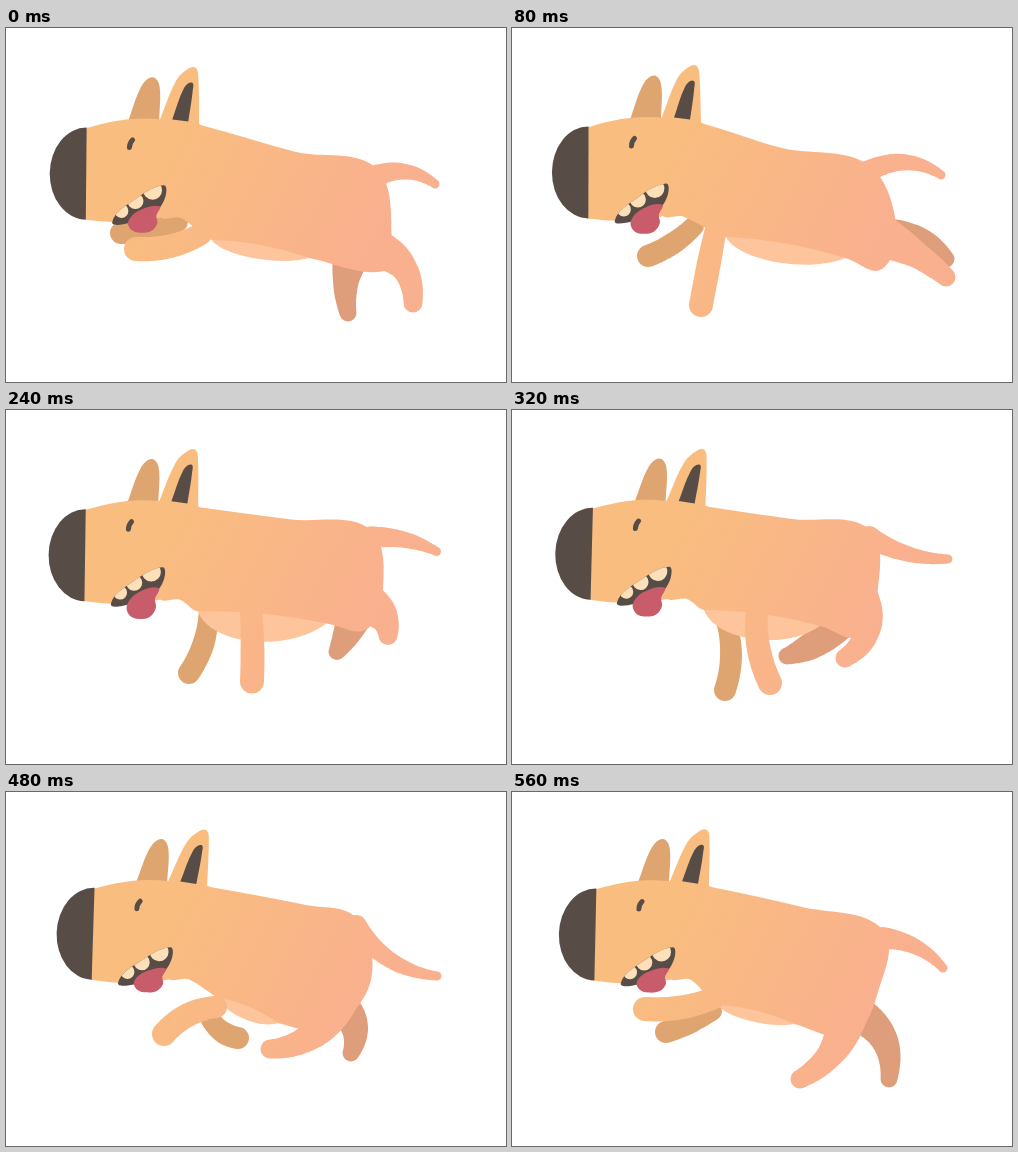
Write an HTML page with a canvas that moves like this. It is 500 by 354 pixels and loops after 640 ms.

```html
<!DOCTYPE html>
<html lang="en">
<head>
<meta charset="utf-8">
<title>Running dog</title>
<style>
html, body { margin: 0; width: 100%; height: 100%; overflow: hidden; background: #fff; }
canvas { display: block; width: 500px; height: 354px; }
</style>
</head>
<body>
<canvas id="stage" width="500" height="354"></canvas>
<script>
const ctx = document.getElementById('stage').getContext('2d');
const STEP = 80;
// Which key pose each step shows; halves blend two neighbours.
const CYCLE = [0, 1, 2, 2.5, 3, 3.5, 4, 5];

const DARK = '#574d46', FAR_FRONT = '#dfa571', FAR_HIND = '#de9d7b';
const TONGUE = '#c85c6a', TOOTH = '#fddfb9', BELLY = '#fec49c';
const coat = ctx.createLinearGradient(170, 100, 370, 205);
coat.addColorStop(0, '#f9bd7f');
coat.addColorStop(1, '#f9b08f');

// Radii at the root, middle and end of each kind of limb
const FRONT = [11, 12, 12], NEAR_HIND = [22, 13, 9.5], FAR_LEG = [20, 13, 8.5], TAIL = [11, 7.5, 4.5];

// Rig joints as x, y pairs, one row per key pose
const rig = {
  head: [[0, 0], [-4, -1.5], [-2, 0.5], [0, -1], [7.5, -2.8], [3.5, -2.5]]
};
// spine, croup, rump, groin, belly back, belly front
rig.body = [
  [290,124, 370,140, 386,212, 378,243, 303,230, 206,212],
  [270,120, 355,136, 384,195, 370,241, 333,230, 214,209],
  [290,110, 371,120, 388,186, 375,213, 333,211, 192,203],
  [280,109, 357,119, 366,178, 345,226, 308,216, 192,200],
  [300,113, 350,126, 365,188, 325,236, 272,231, 213,206],
  [290,115, 371,138, 366,200, 339,244, 282,232, 206,213]
];
// middle, tip
rig.tail = [
  [402,144, 429,156], [400,135, 429,147], [411,118, 425,134],
  [400,145, 436,149], [395,174, 431,184], [406,156, 431,176]
];
// shoulder, elbow, paw
rig.nearFront = [
  [195,206, 155,220, 130,221], [203,205, 197,235, 189,277], [245,200, 245,240, 234,270],
  [245,200, 248,245, 258,273], [210,215, 182,223, 158,242], [202,206, 165,216, 133,217]
];
rig.farFront = [
  [172,194, 145,202, 115,205], [182,198, 160,216, 136,228], [193,203, 175,225, 153,246],
  [212,205, 219,245, 213,280], [205,228, 220,242, 232,246], [200,219, 175,232, 154,240]
];
// knee, paw
rig.nearHind = [
  [398,240, 407,275], [405,227, 434,249], [405,200, 431,203],
  [354,222, 333,248], [300,247, 264,257], [317,264, 288,287]
];
rig.farHind = [
  [340,252, 342,285], [415,217, 434,231], [384,215, 387,237],
  [295,238, 275,246], [349,238, 345,261], [374,252, 377,287]
];

// Parts of the head, before it is moved
const skull = [79,101, 101,95, 126,91, 152,91, 198,99, 225,130, 200,175, 165,188, 108,194, 79,192];
const farEar = [122,93, 135,58, 146,49, 153,58, 153,93];
const nearEar = [153,93, 169,52, 181,40, 188,39, 191,47, 193,98];
const innerEar = [166,91, 177,60, 185,54, 186,62, 182,93];
const mouth = [107,194, 130,171, 158,157, 160,168, 150,184, 124,195];
const tongue = [123,194, 133,183, 154,178, 151,188, 152,196, 146,204, 135,206, 126,203];

const mix = (a, b, f) => a.map((v, i) => v + (b[i] - v) * f);
const blend = (rows, k) => mix(rows[Math.floor(k)], rows[Math.ceil(k)], k % 1);
const wave = (step, peak) => Math.cos((step - peak) * Math.PI / 4);

function fill(color) {
  ctx.fillStyle = color;
  ctx.fill();
}

// Smooth shape through flat x, y points
function blob(pts, color, closed = true) {
  const n = pts.length / 2;
  const at = i => {
    const k = closed ? (i + n) % n : Math.max(0, Math.min(n - 1, i));
    return [pts[2 * k], pts[2 * k + 1]];
  };
  const dir = i => {
    const [ax, ay] = at(i - 1), [bx, by] = at(i + 1);
    const d = Math.hypot(bx - ax, by - ay) || 1;
    return [(bx - ax) / d, (by - ay) / d];
  };
  ctx.beginPath();
  ctx.moveTo(...at(0));
  for (let i = 0; i < (closed ? n : n - 1); i++) {
    const [ax, ay] = at(i), [bx, by] = at(i + 1);
    const [ux, uy] = dir(i), [vx, vy] = dir(i + 1);
    const h = Math.hypot(bx - ax, by - ay) / 3;
    ctx.bezierCurveTo(ax + ux * h, ay + uy * h, bx - vx * h, by - vy * h, bx, by);
  }
  fill(color);
}

// Tapered limb that bends through three joints
function limb([ax, ay, bx, by, cx, cy], [ra, rb, rc], color) {
  const la = Math.hypot(bx - ax, by - ay), lb = Math.hypot(cx - bx, cy - by);
  const m = la / (la + lb);
  const bend = (a, b, c) => (b - (1 - m) ** 2 * a - m * m * c) / (2 * m * (1 - m));
  const qx = bend(ax, bx, cx), qy = bend(ay, by, cy);
  const along = (a, q, c, t) => (1 - t) ** 2 * a + 2 * t * (1 - t) * q + t * t * c;
  ctx.beginPath();
  for (let i = 0; i <= 50; i++) {
    const t = i / 50;
    const x = along(ax, qx, cx, t), y = along(ay, qy, cy, t);
    const r = t < m ? ra + (rb - ra) * t / m : rb + (rc - rb) * (t - m) / (1 - m);
    ctx.moveTo(x + r, y);
    ctx.arc(x, y, r, 0, 2 * Math.PI);
  }
  fill(color);
}

function drawBelly(front, back, depth) {
  const [x1, y1] = mix(front, back, 0.5), [x2, y2] = mix(front, back, 0.7), [x3, y3] = mix(front, back, 0.1);
  ctx.beginPath();
  ctx.moveTo(...front);
  ctx.quadraticCurveTo(x1, y1 - 8, ...back);
  ctx.bezierCurveTo(x2, y2 + depth * 1.4, x3, y3 + depth * 1.4, ...front);
  fill(BELLY);
}

function inHead([dx, dy], turn, paint) {
  ctx.save();
  ctx.translate(125 + dx, 116 + dy);
  ctx.rotate(turn * Math.PI / 180);
  ctx.translate(-125, -116);
  paint();
  ctx.restore();
}

// Slant an ear: higher points move further
const slant = (pts, lean) =>
  pts.map((v, i) => i % 2 ? v : v + lean * (97 - pts[i + 1]) / 59);

function drawFace(lean, droop) {
  blob(skull, coat, false);
  blob(slant(nearEar, lean), coat, false);
  blob(slant(innerEar, lean / 2), DARK, false);

  ctx.beginPath();
  ctx.ellipse(80.5, 146, 36.5, 46, 0, Math.PI / 2, Math.PI * 1.5);
  fill(DARK);

  ctx.beginPath();
  ctx.moveTo(126.5, 112);
  ctx.quadraticCurveTo(123.5, 115, 123.5, 119.5);
  ctx.lineWidth = 5;
  ctx.lineCap = 'round';
  ctx.strokeStyle = DARK;
  ctx.stroke();

  ctx.save();
  blob(mouth, DARK);
  ctx.clip();
  for (const [x, y, r] of [[116, 183, 7], [130, 173, 8], [147, 162, 9.5]]) {
    ctx.beginPath();
    ctx.arc(x, y, r, 0, 2 * Math.PI);
    fill(TOOTH);
  }
  ctx.restore();
  blob(tongue.map((v, i) => i % 2 ? v + droop * (v - 180) / 27 : v), TONGUE);
}

function drawDog(step) {
  const pose = {};
  for (const part in rig) pose[part] = blend(rig[part], CYCLE[step]);
  const { head, body } = pose, [dx, dy] = head;
  const croup = body.slice(2, 4), rump = body.slice(4, 6);
  const back = body.slice(8, 10), front = body.slice(10);
  const turn = 1 + 0.9 * wave(step, 5.3);

  ctx.fillStyle = '#fff';
  ctx.fillRect(0, 0, 500, 354);

  inHead(head, turn, () => blob(farEar, FAR_FRONT, false));
  limb(pose.farFront, FRONT.map(r => r - 1), FAR_FRONT);
  limb([...mix(rump, back, 0.45), ...pose.farHind], FAR_LEG, FAR_HIND);
  limb([croup[0], croup[1] + 8, ...pose.tail], TAIL, coat);
  blob([168 + dx, 93 + dy, 198 + dx, 98 + dy, ...body, 175 + dx, 190 + dy, 155 + dx, 188 + dy], coat);
  drawBelly(front, back, 15.5 + 8 * wave(step, 3));
  limb([...mix(rump, back, 0.35), ...pose.nearHind], NEAR_HIND, coat);
  limb(pose.nearFront, FRONT, coat);
  inHead(head, turn, () => drawFace(1.5 * turn, 3.5 * wave(step, 2.5)));
}

const start = performance.now();
function tick() {
  drawDog(Math.floor((performance.now() - start) / STEP) % CYCLE.length);
  requestAnimationFrame(tick);
}
tick();
</script>
</body>
</html>
```
